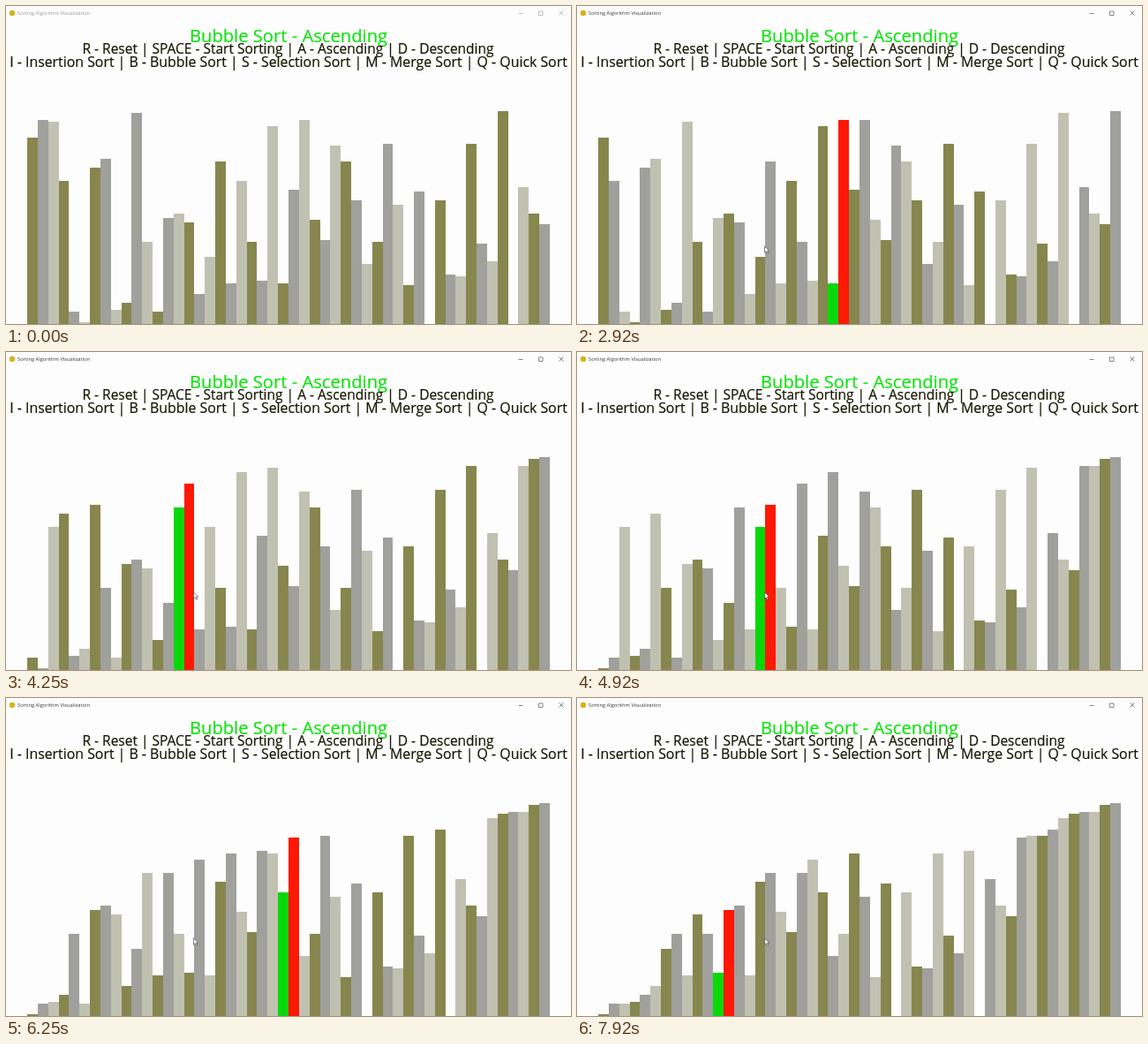
An HTML page that plays this animation: 640 px wide and 360 px high, repeating every 8 s.

```html
<!DOCTYPE html>
<html lang="en">
<head>
<meta charset="utf-8">
<title>Sorting Algorithm Visualization</title>
<style>
  html, body { margin: 0; width: 100%; height: 100%; overflow: hidden; background: #fdfdfd; }
  svg { display: block; width: 100vw; height: 100vh; }
  text { font-family: "Open Sans", "Noto Sans", sans-serif; }
  .head { text-anchor: middle; fill: #171700; stroke: #171700; stroke-width: .2; }
  #bars { shape-rendering: crispEdges; }
</style>
</head>
<body>
<svg viewBox="0 0 640 360">
  <rect width="640" height="360" fill="#fdfdfd"/>
  <circle cx="7" cy="8" r="3.2" fill="#d9b21c"/>
  <g id="chrome">
    <text x="13" y="10" font-size="5.74" fill="#333">Sorting Algorithm Visualization</text>
    <path d="M580.500 8.500h5M603.500 6h4.500v4.500h-4.500zM626.500 5.500l5 5m0 -5l-5 5"
      fill="none" stroke="#555" stroke-width=".7"/>
  </g>
  <text class="head" x="320" y="41" font-size="20.2" style="fill:#0ce40c;stroke:#0ce40c">Bubble Sort - Ascending</text>
  <text class="head" x="319.500" y="54" font-size="15.5">R - Reset | SPACE - Start Sorting | A - Ascending | D - Descending</text>
  <text class="head" x="320" y="69" font-size="15.87">I - Insertion Sort | B - Bubble Sort | S - Selection Sort | M - Merge Sort | Q - Quick Sort</text>
  <g id="bars"></g>
  <path id="cursor" d="M212.500 272v7.200l1.700 -1.500 1.300 2.700 1.200 -.6 -1.200 -2.600h2.300z"
    fill="#fff" stroke="#333" stroke-width=".6"/>
</svg>
<script>
const LOOP = 8000, FPS = 12, FLOOR = 360;
const SHADES = ['#86864e', '#a0a09c', '#c1c1b2'];
const GREEN = '#08d80a', RED = '#ff1804';
const tops = [
  149, 129, 131, 198, 346, 358, 183, 173, 344, 336,
  121, 267, 346, 240, 235, 245, 326, 284, 176, 314,
  198, 267, 311, 136, 314, 208, 129, 242, 265, 158,
  176, 220, 292, 267, 156, 225, 316, 210, 360, 220,
  304, 306, 156, 269, 289, 119, 360, 205, 235, 247];

// [tick, pass, index of the swap shown at that tick]
const marks = [[23, 1, 7], [35, 2, 22], [44, 3, 20], [59, 5, 15], [75, 7, 24], [95, 11, 11]];

// Bubble sort, one state per swap; smaller top means taller bar
function record(list) {
  const a = list.slice(), states = [{ a: list, j: -2 }];
  for (let pass = 1; pass < a.length; pass++) {
    for (let j = 0; j < a.length - pass; j++) {
      if (a[j] > a[j + 1] || a[j] === a[j + 1]) continue;
      [a[j], a[j + 1]] = [a[j + 1], a[j]];
      states.push({ a: a.slice(), pass, j });
    }
  }
  return states;
}

const states = record(tops);
const keys = marks.map(([tick, pass, j]) => {
  const n = states.findIndex(s => s.pass === pass && s.j >= j);
  return [tick, n];
});
keys.unshift([keys[0][0] - keys[0][1] / 5, 0]);

function swapsAt(tick) {
  if (tick <= keys[0][0]) return 0;
  let i = 1;
  while (i < keys.length - 1 && tick > keys[i][0]) i++;
  const [t0, n0] = keys[i - 1], [t1, n1] = keys[i];
  return Math.round(n0 + (n1 - n0) * Math.min(1, (tick - t0) / (t1 - t0)));
}

const $ = id => document.getElementById(id);
const edge = i => Math.round(24 + 11.84 * i);
const bars = tops.map((_, i) => {
  const r = document.createElementNS('http://www.w3.org/2000/svg', 'rect');
  r.setAttribute('x', edge(i));
  r.setAttribute('width', edge(i + 1) - edge(i));
  return $('bars').appendChild(r);
});

function draw(ms) {
  const tick = Math.floor((ms + 4) * FPS / 1000);
  const { a, j } = states[swapsAt(tick)];
  bars.forEach((bar, i) => {
    bar.setAttribute('y', a[i]);
    bar.setAttribute('height', FLOOR - a[i]);
    bar.setAttribute('fill', i === j ? GREEN : i === j + 1 ? RED : SHADES[i % 3]);
  });
  const active = tick >= 11;
  $('chrome').setAttribute('opacity', active ? 1 : .5);
  $('cursor').setAttribute('visibility', active ? 'visible' : 'hidden');
}

const start = performance.now();
function loop() {
  draw((performance.now() - start) % LOOP);
  requestAnimationFrame(loop);
}
draw(0);
requestAnimationFrame(loop);
</script>
</body>
</html>
```
